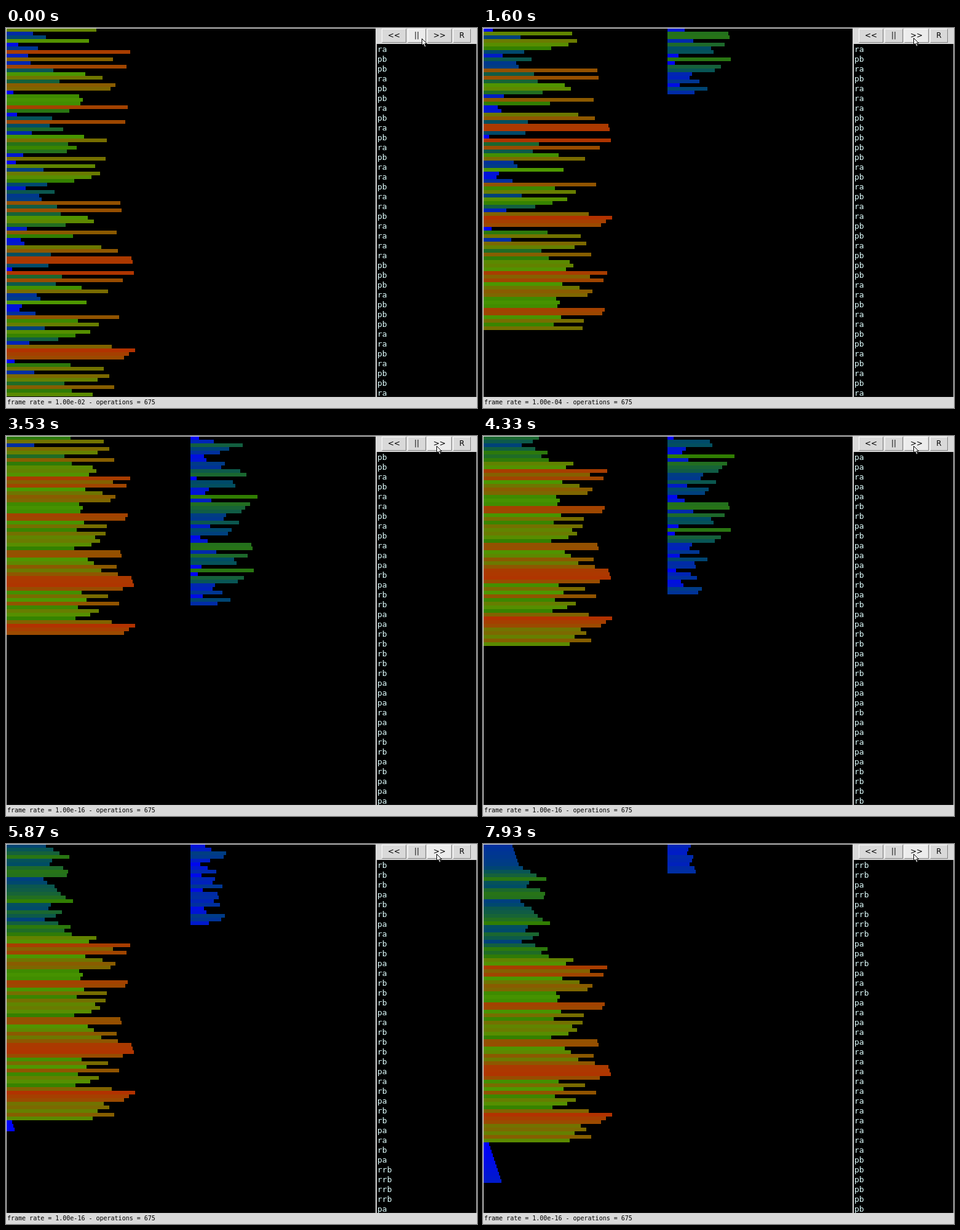
Animation of 766 by 619 pixels, one loop 8000 ms. Source, as an HTML page with a canvas:

```html
<!DOCTYPE html>
<html lang="en">
<head>
<meta charset="utf-8">
<title>Two-stack sort</title>
<style>
html, body { margin: 0; width: 100%; height: 100%; overflow: hidden; background: #d9d9d9; }
body { position: relative; color: #000; }
canvas { position: absolute; left: 1px; top: 1px; background: #000; }
.btn {
  position: absolute; top: 1px; height: 23px; box-sizing: border-box;
  border: 1px solid; border-color: #fff #828282 #828282 #fff;
  font: 12px/21px "DejaVu Sans", sans-serif; text-align: center;
}
.btn.hot { background: #ececec; }
.btn.down { border-color: #828282 #fff #fff #828282; }
#log { position: absolute; left: 603px; top: 26px; width: 162px; height: 575px; overflow: hidden; background: #000; }
#ops {
  position: absolute; left: 1px; top: 1px; margin: 0; color: #e0ffff;
  font: 13px/16px "DejaVu Sans Mono", monospace;
}
#status {
  position: absolute; left: 2px; top: 602px; white-space: pre;
  font: 10px/16px "DejaVu Sans Mono", monospace;
}
#cursor { position: absolute; left: 0; top: 0; overflow: visible; }
</style>
</head>
<body>
<canvas id="view" width="600" height="600"></canvas>
<div class="btn" style="left:611px;width:40px">&lt;&lt;</div>
<div class="btn" id="pause" style="left:653px;width:30px">||</div>
<div class="btn" id="faster" style="left:685px;width:40px">&gt;&gt;</div>
<div class="btn" style="left:727px;width:29px">R</div>
<div id="log"><pre id="ops"></pre></div>
<div id="status"></div>
<svg id="cursor" width="12" height="18">
  <path d="M.5 .5V11.5L3 9.3L5 14L7 13.2L5 8.6H8.5Z" fill="#fff" stroke="#000" stroke-width="1"/>
</svg>
<script>
const LOOP = 8000, STEP = 1000 / 15;
const start = [
  68, 17, 27, 62, 5, 21, 95, 13, 81, 15, 92, 33, 59, 73, 38, 83, 79, 1, 54, 57,
  55, 93, 46, 4, 32, 91, 30, 41, 16, 58, 76, 45, 52, 44, 9, 75, 3, 67, 25, 71,
  64, 50, 28, 11, 34, 22, 24, 87, 36, 88, 39, 61, 66, 43, 12, 84, 49, 7, 10, 72,
  85, 31, 96, 97, 29, 0, 98, 40, 89, 35, 56, 77, 20, 23, 60, 8, 6, 19, 86, 53,
  70, 26, 63, 51, 37, 14, 80, 99, 94, 90, 2, 47, 74, 18, 78, 69, 42, 82, 48, 65
];

// Sort: record every operation and the stacks after it
const a = [...start], b = [];
const ops = [], states = [{ a: start, b: [] }];
const moves = {
  pa: () => a.unshift(b.shift()),
  pb: () => b.unshift(a.shift()),
  ra: () => a.push(a.shift()),
  rb: () => b.push(b.shift()),
  rrb: () => b.unshift(b.pop())
};
function run(op, times = 1) {
  while (times--) {
    moves[op]();
    ops.push(op);
    states.push({ a: [...a], b: [...b] });
  }
}
for (const v of start) run(v < 50 ? 'pb' : 'ra');
while (b.length) {
  const v = b[0];
  if (v === Math.min(...b)) { run('pa'); run('ra'); }
  else if (v >= 25 || v === Math.max(...b)) run('pa');
  else run(b.length > 14 ? 'rb' : 'rrb');
}
run('ra', 10);
run('pb', 12);

const $ = id => document.getElementById(id);
const ctx = $('view').getContext('2d');
$('ops').textContent = ops.join('\n');

// [tick, operations done]
const pace = [[0, 0], [12, 16], [24, 36], [36, 59], [53, 91], [77, 139], [99, 186], [119, 220]];
const clicks = [11, 38, 43];

function opsDone(tick) {
  const i = Math.max(1, pace.findIndex(p => p[0] >= tick));
  const [t0, n0] = pace[i - 1], [t1, n1] = pace[i];
  return Math.floor(n0 + (n1 - n0) * (tick - t0) / (t1 - t0) + 1e-6);
}

function color(f) {
  const rgb = [f - 0.3, f < 0.6 ? f : 1.2 - f, 1 - 2 * f];
  return `rgb(${rgb.map(c => Math.floor(255 * Math.max(0, c)))})`;
}

function drawStack(stack, x) {
  stack.forEach((v, i) => {
    const f = v / 99;
    ctx.fillStyle = color(f);
    ctx.fillRect(x - 1, i * 6 - 1, Math.round(10 + 200 * f), 6);
  });
}

let last = -1;
function frame(now) {
  const tick = Math.floor((now % LOOP + 4) / STEP) % 120;
  if (tick !== last) {
    last = tick;
    const n = opsDone(tick);
    ctx.clearRect(0, 0, 600, 600);
    drawStack(states[n].a, 0);
    drawStack(states[n].b, 300);
    $('ops').style.top = 1 - 16 * Math.max(0, n - 1) + 'px';

    const exp = 2 << clicks.filter(c => tick >= c).length;
    $('status').textContent =
      `frame rate = 1.00e-${String(exp).padStart(2, '0')} - operations = 675`;

    const p = Math.min(1, Math.max(0, (tick - 3) / 5));
    const x = Math.round(676 + 24 * p), y = Math.round(17 - p);
    $('cursor').style.transform = `translate(${x}px, ${y}px)`;
    $('pause').classList.toggle('hot', x < 683);
    $('faster').classList.toggle('hot', x >= 685);
    $('faster').classList.toggle('down', clicks.some(c => tick === c - 1));
  }
  requestAnimationFrame(frame);
}
frame(0);
</script>
</body>
</html>
```
